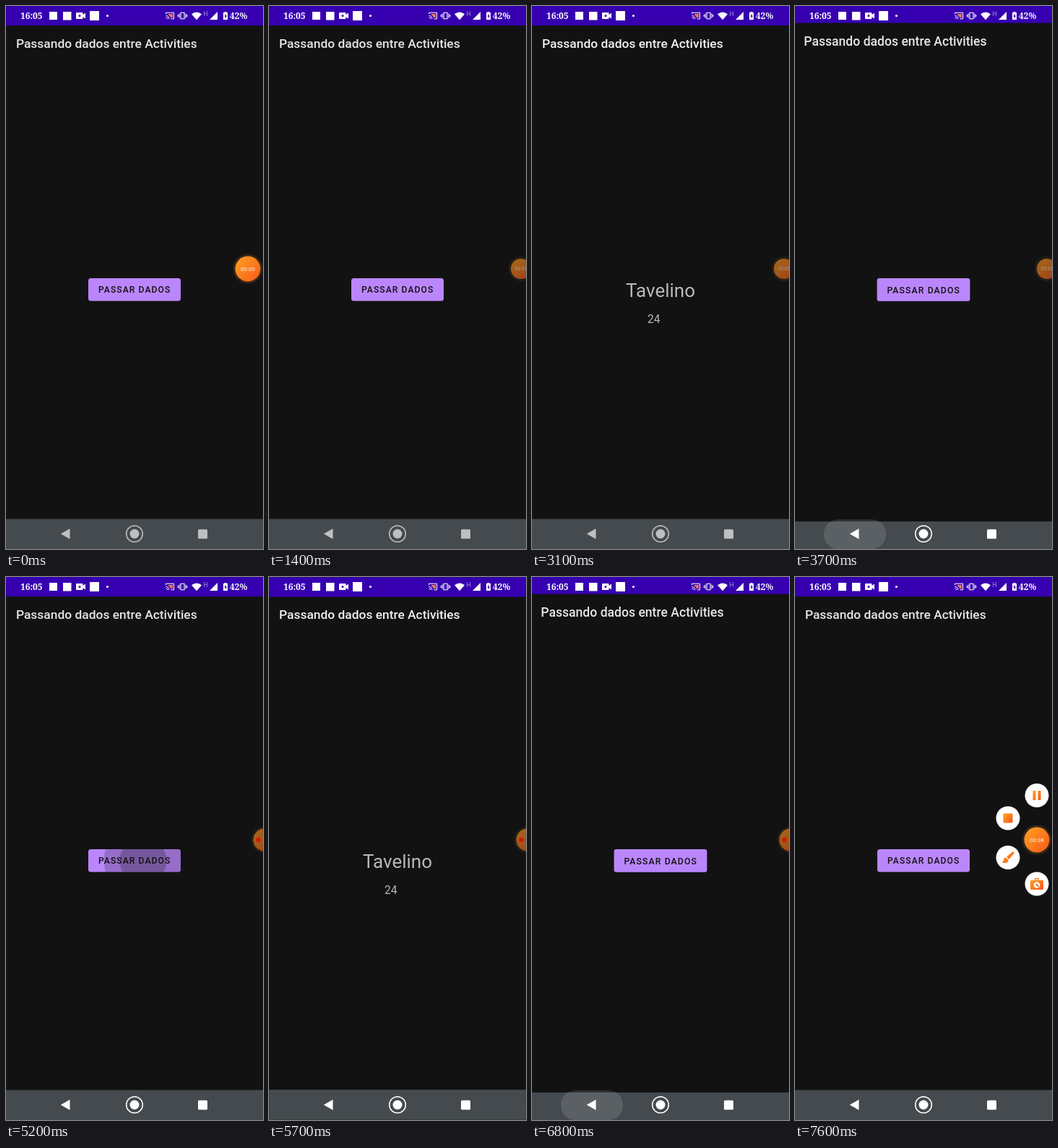
Recreate the animation shown at these times as an HTML page. Size 356 px wide and 752 px high, loop 8.2 s.

```html
<!DOCTYPE html>
<html lang="pt">
<head>
<meta charset="utf-8">
<style>
  html, body { margin: 0; width: 100%; height: 100%; overflow: hidden; background: #121212; }
  svg { display: block; width: 100%; height: 100%; }
  text { font-family: Roboto, sans-serif; }
  .status { font: bold 12px "Noto Serif", serif; }
  .title { font-size: 17.4px; font-weight: 500; }
  .mid { text-anchor: middle; }
</style>
</head>
<body>
<svg viewBox="0 0 356 752">
  <defs>
    <linearGradient id="orange" x1="0" y1="0" x2="1" y2="1">
      <stop offset="0" stop-color="#ffa321"/>
      <stop offset="1" stop-color="#f8581a"/>
    </linearGradient>
    <clipPath id="buttonShape"><rect x="114" y="377" width="128" height="31.5" rx="3.5"/></clipPath>
    <g id="window">
      <rect width="356" height="752" fill="#121212"/>
      <rect width="356" height="27" fill="#3600b0"/>
      <rect y="710.5" width="356" height="41.5" fill="#444a4e"/>
    </g>
  </defs>

  <g id="home">
    <use href="#window"/>
    <text class="title" x="13.9" y="58" fill="#e6e6e6">Passando dados entre Activities</text>
    <g clip-path="url(#buttonShape)">
      <rect x="114" y="377" width="128" height="32" fill="#bb86fc"/>
      <g id="ripple">
        <circle id="rippleOuter" cx="190" cy="393" fill="#121212" opacity=".22"/>
        <circle id="rippleInner" cx="190" cy="393" fill="#121212" opacity=".24"/>
      </g>
    </g>
    <text x="128" y="397.4" font-size="12.12" font-weight="500" letter-spacing="1.08" fill="#121212">PASSAR DADOS</text>
  </g>

  <g id="detail">
    <use href="#window"/>
    <text class="title" x="13.9" y="58" fill="#f2f2f2">Passando dados entre Activities</text>
    <text class="mid" x="178" y="403" font-size="26" fill="#b9b9b9">Tavelino</text>
    <text x="160" y="439" font-size="15.6" fill="#b9b9b9">24</text>
  </g>

  <g fill="#fff">
    <text class="status" x="20" y="18">16:05</text>
    <rect x="60" y="8" width="11" height="11"/>
    <rect x="79" y="8" width="11.5" height="11.5"/>
    <path d="M98 9h7.500a1 1 0 0 1 1 1v2l3.500-2.500v8l-3.500-2.500v2a1 1 0 0 1-1 1H98a1 1 0 0 1-1-1v-7a1 1 0 0 1 1-1z"/>
    <circle cx="102" cy="13.500" r="1.500" fill="#3600b0"/>
    <rect x="116" y="7" width="13" height="13"/>
    <circle cx="140.500" cy="13.500" r="1.600"/>
    <path d="M225 11h6v5h-3q-1-3-3-3.500z" fill="#e8775a"/>
    <path d="M221.500 11V9.200h11v8.600h-4M221.500 13q4 .5 4.500 5M221.500 15.500q2 .5 2.300 2.500" fill="none" stroke="#fff"/>
    <path d="M242 9.200h5v8.600h-5zM240 10.500v6M249 10.500v6M238.300 12v3M250.700 12v3" fill="none" stroke="#fff" stroke-width="1.100"/>
    <path d="M257 11.200q7-5.400 14 0l-7 8z"/>
    <text x="273.500" y="14" font-size="8.500" opacity=".55">H</text>
    <path d="M282 19h11V8z"/>
    <path d="M302.500 9V8h3v1h1.500v10h-6V9z"/>
    <path d="M304.600 10.500l-2.200 4h1.400v3l2.200-4h-1.400z" fill="#3600b0"/>
    <text class="status" x="310" y="18">42%</text>
  </g>

  <rect id="backGlow" y="711" height="41" rx="20" fill="#fff"/>
  <g id="nav" fill="#fff">
    <path d="M75.800 731l12.700-7.200v14.400z"/>
    <circle cx="178" cy="731" r="11.300" fill="none" stroke="#fff" stroke-width="1.500"/>
    <circle cx="178" cy="731" r="6.500"/>
    <rect x="266" y="724.800" width="13" height="13" rx="1.500"/>
  </g>

  <g id="menu">
    <g class="tool">
      <circle r="16.500" fill="#fff"/>
      <path d="M-5.500-6.500h4v13h-4zM1.500-6.500h4v13h-4z" fill="url(#orange)"/>
    </g>
    <g class="tool">
      <circle r="16.500" fill="#fff"/>
      <rect x="-6.500" y="-6.500" width="13" height="13" rx="1" fill="url(#orange)"/>
    </g>
    <g class="tool">
      <circle r="16.500" fill="#fff"/>
      <path d="M7-8.500l2 2L1.500 2.500-2-1zM-3 0l3.500 3.500C1 7-4 9-9 6.500q3-.5 3-3.500 .5-3 3-3z" fill="url(#orange)"/>
    </g>
    <g class="tool">
      <circle r="16.500" fill="#fff"/>
      <path d="M-3-5v-3h6v3h5a1 1 0 0 1 1 1V7a1 1 0 0 1-1 1H-8a1 1 0 0 1-1-1V-4a1 1 0 0 1 1-1zM-1.500-5h3v-1.500h-3z" fill="url(#orange)" fill-rule="evenodd"/>
      <circle cy="1.500" r="4.300" fill="#fff"/>
      <path d="M-1.500 0L2.300 3.800" stroke="#f8701a" stroke-width="2.200"/>
    </g>
  </g>

  <g id="recorder">
    <g id="ball">
      <circle id="halo" fill="#ff9a40" opacity=".14"/>
      <circle id="disc" fill="url(#orange)"/>
      <text id="timer" class="mid" fill="#fff"></text>
    </g>
    <circle id="dot" cx="-8.500" r="3.200" fill="#d0190c"/>
  </g>
</svg>

<script>
const LOOP = 8200;
const OPENINGS = [1780, 5400], CLOSINGS = [3550, 6650];
const TOOL_OFFSETS = [[0, -61.5], [-40, -30], [-40, 24.5], [0, 61]];
const el = id => document.getElementById(id);
const set = (id, attrs) => {
  for (const name in attrs) el(id).setAttribute(name, attrs[name]);
};
const tools = document.querySelectorAll('.tool');

const clamp = v => Math.min(1, Math.max(0, v));
const ramp = (t, from, to) => clamp((t - from) / (to - from));
const ease = (t, from, to) => {
  const p = ramp(t, from, to);
  return p * p * (3 - 2 * p);
};
const mix = (a, b, p) => a + (b - a) * p;
const bezier = (a, b, c, d, u) => {
  const v = 1 - u;
  return a * v * v * v + 3 * b * v * v * u + 3 * c * v * u * u + d * u * u * u;
};

// Two-part curve: quick start, very slow finish.
function windowEase(x) {
  if (x <= 0 || x >= 1) return clamp(x);
  const [xs, ys] = x < 1 / 6
    ? [[0, 0.05, 0.1333, 1 / 6], [0, 0, 0.06, 0.4]]
    : [[1 / 6, 0.2083, 0.25, 1], [0.4, 0.82, 1, 1]];
  let low = 0, high = 1;
  for (let i = 0; i < 24; i++) {
    const u = (low + high) / 2;
    if (bezier(...xs, u) < x) low = u; else high = u;
  }
  return bezier(...ys, low);
}

function drawWindow(id, scale, opacity) {
  set(id, {
    transform: `translate(178 376) scale(${scale}) translate(-178 -376)`,
    opacity
  });
}

function drawWindows(t) {
  const opened = OPENINGS.filter(s => s <= t).pop() ?? -Infinity;
  const closed = CLOSINGS.filter(s => s <= t).pop() ?? -Infinity;
  const opening = opened > closed;
  const age = t - Math.max(opened, closed);
  const p = windowEase(age / 400);
  if (opening) {
    drawWindow('home', mix(1, 1.05, p), 1);
    drawWindow('detail', mix(0.85, 1, p), ramp(age, 50, 133));
  } else {
    drawWindow('home', mix(1.1, 1, p), 1);
    drawWindow('detail', mix(1, 0.9, p), 1 - ramp(age, 35, 85));
  }
}

function drawTouches(t) {
  const press = OPENINGS.map(s => t - s + 280).find(a => a >= 0 && a < 550) ?? -1;
  set('ripple', { opacity: press < 0 ? 0 : 1 - ramp(press, 300, 550) });
  set('rippleOuter', { r: 18 + 0.45 * Math.max(0, press) });
  set('rippleInner', { r: 4 + 0.35 * Math.max(0, press) });

  const back = CLOSINGS.map(s => t - s + 70).find(a => a >= 0 && a < 600) ?? -1;
  const width = mix(56, 86, ease(back, 0, 150));
  set('backGlow', {
    x: 83 - width / 2,
    width,
    opacity: 0.12 * ramp(back, 0, 100) * (1 - ramp(back, 250, 580))
  });
  set('nav', { opacity: mix(0.65, 1, ramp(t, 3480, 3600)) });
}

function drawRecorder(t) {
  const docked = ease(t, 150, 600);
  const dimmed = ease(t, 1000, 1400);
  const tucked = ease(t, 4850, 5000);
  const open = ease(t, 7350, 7580);
  const x = mix(335 + 14 * docked + 9 * tucked, 335, open);
  const r = mix(17.5 - 3.5 * docked + 1.5 * tucked, 17.5, open);
  const showDot = tucked > 0.5 && open < 0.5;
  const seconds = open > 0 ? 8 : Math.floor(t / 1000);

  set('recorder', { transform: `translate(${x} 364)` });
  set('ball', { opacity: mix(1 - 0.38 * dimmed, 1, open) });
  set('halo', { r: r + 3 });
  set('disc', { r });
  set('timer', { 'font-size': r * 0.455, y: r * 0.16, opacity: showDot ? 0 : 0.9 });
  el('timer').textContent = '00:0' + seconds;
  set('dot', { opacity: showDot ? 1 : 0 });

  set('menu', { opacity: open });
  tools.forEach((tool, i) => {
    const [dx, dy] = TOOL_OFFSETS[i];
    tool.setAttribute('transform',
      `translate(${335 + dx * open} ${364 + dy * open}) scale(${mix(0.4, 1, open)})`);
  });
}

function frame(now) {
  const t = now % LOOP;
  drawWindows(t);
  drawTouches(t);
  drawRecorder(t);
  requestAnimationFrame(frame);
}
frame(0);
</script>
</body>
</html>
```
